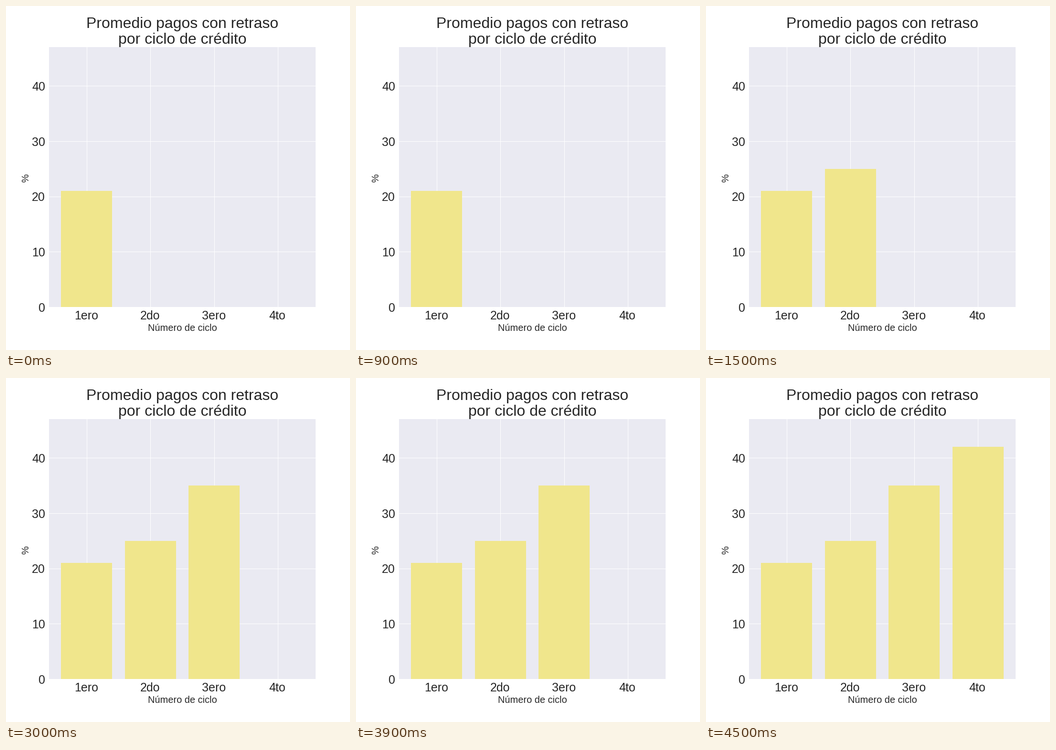
A matplotlib script for the animation above (6 s loop, 720x720 px).

```python
import matplotlib.pyplot as plt
from matplotlib.animation import FuncAnimation
from matplotlib.transforms import Affine2D

CYCLES = ["1ero", "2do", "3ero", "4to"]
LATE_SHARE = [21, 25, 35, 42]
HOLD_MS = 1500

INK = "#262626"
PANEL = "#EAEAF2"
BAR = "#F0E68C"

plt.rcParams.update({
    "font.family": "Liberation Sans",
    "text.color": INK,
    "axes.labelcolor": INK,
})

fig = plt.figure(figsize=(10, 10), dpi=72, facecolor="white")
ax = fig.add_axes([0.125, 0.125, 0.775, 0.755], facecolor=PANEL)

bars = ax.bar(range(len(CYCLES)), LATE_SHARE, width=0.8, color=BAR)

ax.set_xlim(-0.59, 3.59)
ax.set_ylim(0, 47)
ax.set_xticks(range(len(CYCLES)), CYCLES)
ax.set_yticks(range(0, 41, 10))
ax.tick_params(length=0, pad=7, labelsize=25, labelcolor=INK)
ax.set_axisbelow(True)
ax.grid(color="white", linewidth=1)
ax.spines[:].set_visible(False)

# Nudge the tick labels one pixel to the left.
nudge = Affine2D().translate(-1, 0)
for label in ax.get_xticklabels() + ax.get_yticklabels():
    label.set_transform(label.get_transform() + nudge)

ax.set_title("Promedio pagos con retraso\npor ciclo de crédito",
             fontsize=32, pad=5, linespacing=1.16)
ax.set_xlabel("Número de ciclo", fontsize=20, labelpad=4)
ax.set_ylabel("%", fontsize=20, labelpad=3, y=0.497)


def show_bars(step):
    """Reveal one more bar at each step."""
    for i, bar in enumerate(bars):
        bar.set_visible(i <= step)
    return bars.patches


anim = FuncAnimation(fig, show_bars, frames=len(CYCLES), interval=HOLD_MS,
                     init_func=lambda: show_bars(0), repeat=True,
                     repeat_delay=0)

plt.show()
```
